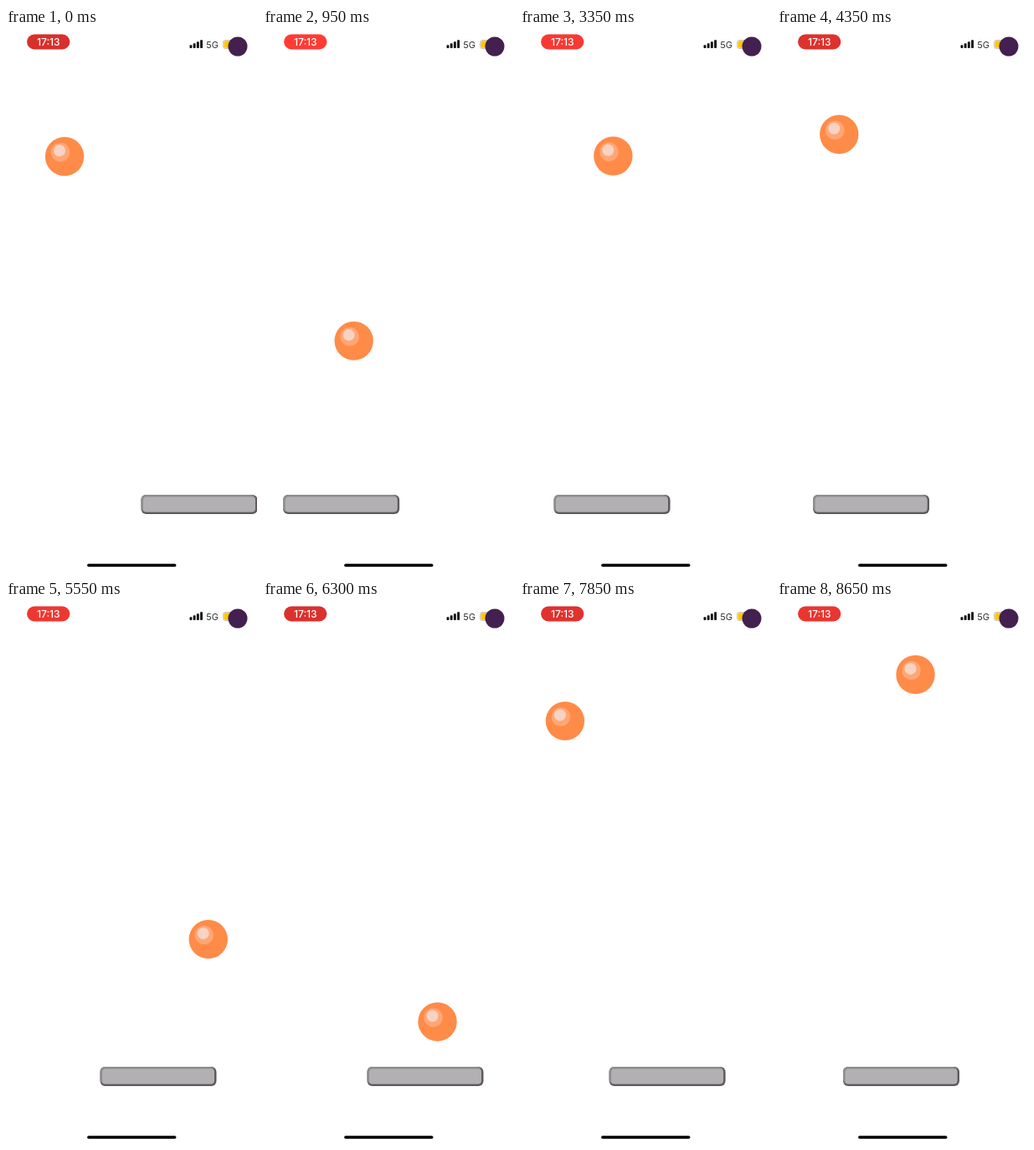
Recreate the animation shown at these times as an HTML page. Size 300x648 px, loop 8700 ms.

```html
<!DOCTYPE html>
<html lang="en">
<head>
<meta charset="utf-8">
<title>Paddle game</title>
<style>
  html, body { margin: 0; width: 100%; height: 100%; overflow: hidden; background: #fff; }
  svg { display: block; }
  text { font-family: Inter, "Liberation Sans", sans-serif; }
</style>
</head>
<body>
<svg width="300" height="648" viewBox="0 0 300 648">
  <g id="paddle">
    <rect width="139" height="23" rx="6" fill="#5f595c"/>
    <rect width="136.5" height="20.5" rx="5.5" fill="#8f8d8f"/>
    <rect x="2.5" y="2.5" width="134" height="18" rx="4" fill="#b3b0b3"/>
  </g>
  <g id="ball">
    <circle r="23.2" fill="#ff8b48"/>
    <circle cx="-5" cy="-5" r="11.2" fill="#ffa676"/>
    <circle cx="-6" cy="-7" r="7" fill="#f6d3c3"/>
  </g>
  <rect id="pill" x="25" y="7.6" width="51.3" height="17.8" rx="8.9"/>
  <text x="50.8" y="20.8" font-size="12" font-weight="500" fill="#fff" text-anchor="middle">17:13</text>
  <g id="bars" fill="#111"></g>
  <text x="239.2" y="23.6" font-size="11" fill="#333">5G</text>
  <rect x="259.5" y="14.5" width="14" height="10" rx="2.5" fill="#fff" stroke="#bbb" stroke-width="0.8"/>
  <rect x="260.4" y="15.3" width="9" height="8.4" rx="1.5" fill="#ffc60a"/>
  <circle cx="277" cy="22" r="11.5" fill="#43204f"/>
  <rect x="97" y="638.2" width="106.5" height="3.6" rx="1.8"/>
</svg>
<script>
  const LOOP = 8700, STEP = 50, PULSE = 2040;
  const PILL_DIM = [216, 48, 44], PILL_LIT = [255, 59, 52];

  const [paddle, ball, pill, bars] =
    ["paddle", "ball", "pill", "bars"].map(id => document.getElementById(id));

  for (let i = 0; i < 4; i++) {
    const h = 3.8 + 2 * i;
    bars.innerHTML += `<rect x="${219.5 + 4.2 * i}" y="${24 - h}" width="2.9" height="${h}" rx="0.8"/>`;
  }

  // Finger drags: [time, paddle left]
  const drags = [[0, 161.5], [900, 23], [1860, 161.5], [2650, 0], [3350, 40.5],
    [4350, 43], [5550, 112.5], [6300, 124.5], [7250, 124.5], [8650, 79]];

  const mix = (a, b, u) => a + (b - a) * u;
  const smooth = u => u * u * (3 - 2 * u);

  // Constant speed, reflected between lo and hi
  function bounce(distance, lo, hi) {
    const span = hi - lo, lap = 2 * span;
    const d = ((distance % lap) + lap) % lap;
    return lo + Math.min(d, lap - d);
  }

  function paddleLeft(t) {
    const i = Math.max(1, drags.findIndex(([time]) => t <= time));
    const [t0, a] = drags[i - 1], [t1, b] = drags[i];
    return mix(a, b, smooth((t - t0) / (t1 - t0)));
  }

  const place = (node, x, y) => node.setAttribute("transform", `translate(${x} ${y})`);

  function draw(time) {
    const t = Math.floor(time % LOOP / STEP) * STEP;
    place(ball, bounce(0.1396 * t - 47, 23, 277.5), bounce(0.2312 * t + 129, 24, 540));
    place(paddle, paddleLeft(t), 556);
    const glow = (1 - Math.cos(2 * Math.PI * t / PULSE)) / 2;
    const color = PILL_DIM.map((c, i) => Math.round(mix(c, PILL_LIT[i], glow)));
    pill.setAttribute("fill", `rgb(${color})`);
  }

  const start = performance.now();
  function tick() {
    draw(performance.now() - start);
    requestAnimationFrame(tick);
  }
  tick();
</script>
</body>
</html>
```
